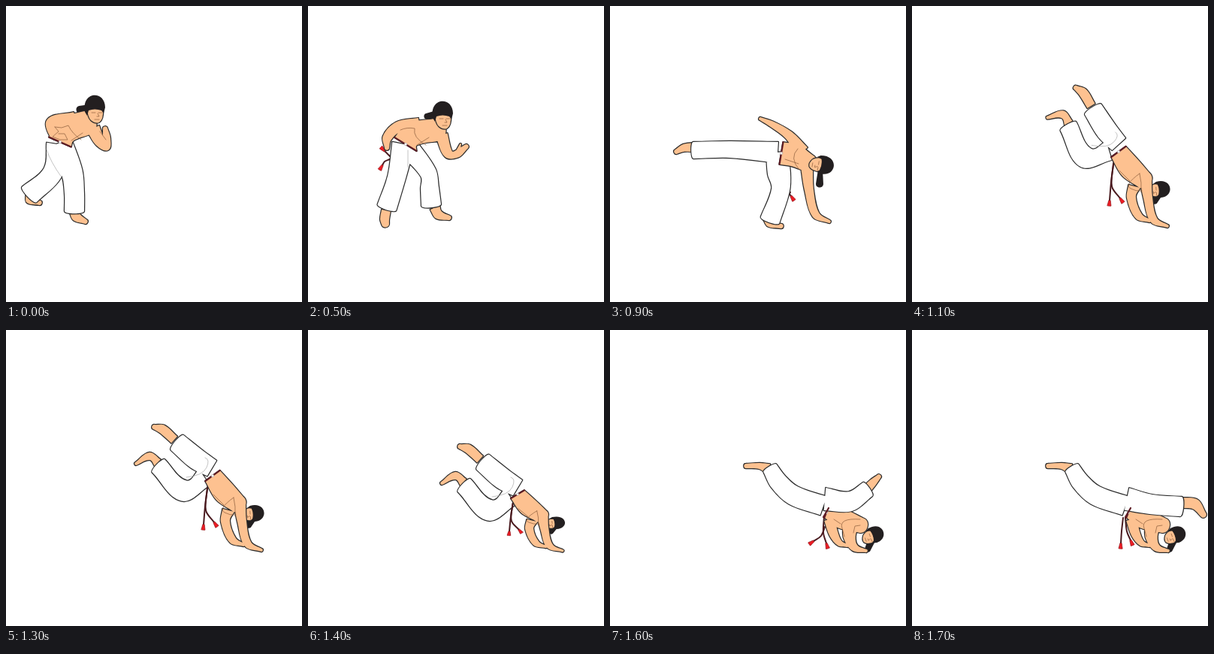
These frames come from a looping animation (394x394 px, 2.7 s). An HTML page:

```html
<!DOCTYPE html>
<html lang="en">
<head>
<meta charset="utf-8">
<title>Capoeira kick</title>
<style>
html, body { margin: 0; width: 100%; height: 100%; overflow: hidden; background: #fff; }
svg { display: block; width: 100%; height: 100%; }
path, circle { fill: none; stroke: #2b2b2b; stroke-linejoin: round; stroke-linecap: round; vector-effect: non-scaling-stroke; }
.skin, .cloth { stroke-width: 2.4; paint-order: stroke; }
.skin { fill: #fdc190; }
.cloth { fill: #fff; }
.hair { fill: #231f20; stroke: none; }
.shade { fill: #a9abae; stroke: none; }
.fold { stroke: #8a5c3c; stroke-width: .7; }
.crease { stroke: #aaa; stroke-width: .7; }
.belt { stroke: #5e1c24; stroke-width: 2.2; }
.cord { stroke: #4a1a1f; stroke-width: 2; }
.red { fill: #ed1c24; stroke: #8c1218; stroke-width: .7; }
.knot { fill: #fff; stroke: #aaa; stroke-width: .5; }
</style>
</head>
<body>
<svg id="stage" viewBox="0 0 394 394"></svg>
<script>
const parse = text => text.split(' ').map(s => s.split(',').map(Number));
const path = (kind, d) => `<path class="${kind}" d="${d}"/>`;
const group = (transform, art) => `<g transform="${transform}">${art}</g>`;

// Unit vector along a chain of points at index i.
function heading(pts, i) {
  const a = pts[Math.max(0, i - 1)], b = pts[Math.min(pts.length - 1, i + 1)];
  const len = Math.hypot(b[0] - a[0], b[1] - a[1]) || 1;
  return [(b[0] - a[0]) / len, (b[1] - a[1]) / len];
}
const shift = (p, v, k) => [p[0] + v[0] * k, p[1] + v[1] * k];

// Smooth open curve, without its starting point.
function smooth(pts) {
  return pts.slice(1).map((q, i) => {
    const p = pts[i], k = Math.hypot(q[0] - p[0], q[1] - p[1]) / 3;
    return `C${shift(p, heading(pts, i), k)} ${shift(q, heading(pts, i + 1), -k)} ${q}`;
  }).join('');
}

function sides(joints) {
  return [1, -1].map(s => joints.map((p, i) => {
    const [x, y] = heading(joints, i);
    return shift(p, [-y, x], s * p[2]);
  }));
}

// Limb outline around "x,y,radius" joints: flat at the start, capped at the end.
function tube(text, cap) {
  const joints = parse(text), end = joints.length - 1;
  const [left, right] = sides(joints);
  const dir = heading(joints, end), bulge = joints[end][2] * cap * 1.33;
  right.reverse();
  return `M${left[0]}${smooth(left)}C${shift(left[end], dir, bulge)} ${shift(right[0], dir, bulge)} ${right[0]}${smooth(right)}Z`;
}

// Tubes of one kind share a path, so only their common outline shows.
const limbs = (kind, cap) => (...list) => path(kind, list.map(s => tube(s, cap)).join(''));
const skin = limbs('skin', .9), legs = limbs('cloth', .25);
const pony = limbs('hair', .9), shade = limbs('shade', .9);
const folds = d => path('fold', d), crease = d => path('crease', d);

function body(torso, ...arms) {
  const [a, b] = sides(parse(torso)).map(side => side[0]);
  return skin(torso, ...arms) + path('belt', `M${a}L${b}`) +
    `<circle class="knot" cx="${(a[0] + b[0]) / 2}" cy="${(a[1] + b[1]) / 2}" r="1.8"/>`;
}

// Cord through the points, with a tassel hanging on in its last direction.
function cord(text) {
  const pts = parse(text), end = pts[pts.length - 1];
  const tip = shift(end, heading(pts, pts.length - 1), 7);
  return path('cord', `M${pts[0]}${smooth(pts)}`) + path('red', tube(`${end.join()},1.2 ${tip.join()},2.6`, .1));
}

const head = (x, y, turn = 0, size = 1) => group(`translate(${x} ${y}) rotate(${turn}) scale(${size})`,
  path('skin', 'M-10,0H11Q12,14 6,18Q1,20 -5,15Q-9,11 -10,0Z') +
  path('hair', 'M-13,4C-18,-24 14,-25 14,-2L12,6 9,2Q0,-1 -8,2L-10,9Z') +
  folds('M-4,5H1M5,5H10M0,14H6M4,6L6,10H3'));

const crouch =
  skin('33,252,7 31,258,5 45,262,3', '91,272,7 94,281,6 106,287,3') +
  pony('112,136,5 98,138,5') +
  legs('68,184,14 62,222,13 31,251,14', '72,182,16 88,222,14 91,250,13 91,273,13') +
  crease('M54,191Q59,207 74,228') +
  body('72,181,16 79,165,18 106,156,16', '92,149,8 60,157,8 64,171,6 74,177,4',
    '116,163,9 126,183,6 133,188,5 134,176,5 132,163,3') +
  folds('M65,161L74,162 83,159Q88,170 100,178M65,161L70,167 62,174 72,178H82L78,170H70M87,179L102,169M125,167L133,178') +
  head(118, 137);

const reach =
  skin('104,272,6 102,284,6 103,290,5', '169,268,7 174,278,6 188,282,3') +
  cord('109,200 106,197 102,193') + cord('109,204 102,207 99,212') +
  pony('172,144,5 158,147,4') +
  legs('127,184,15 118,228,12 105,268,13', '133,188,14 160,222,11 162,242,12 164,265,13') +
  crease('M133,192V215') +
  body('130,184,17 138,171,16 170,165,15', '148,157,8 120,161,7 105,176,6 105,189,3',
    '178,172,8 187,197,6 198,197,5 211,187,3', '199,195,3 203,184,1') +
  folds('M123,165Q132,161 142,163Q139,175 157,185M145,185L161,175') +
  head(179, 145);

const lunge =
  skin('110,277,5 105,286,4 95,288,2', '211,277,5 210,286,4 235,288,2') +
  cord('199,241 197,253 188,256') +
  legs('192,212,14 152,245,14 117,278,14', '196,216,13 209,235,13 211,278,14') +
  head(242, 172, -5, .85) +
  body('190,211,15 206,194,16 226,182,11', '226,181,9 249,191,5 264,193,4 278,194,2',
    '232,192,9 242,214,6 258,236,5 268,253,3') +
  folds('M242,194Q222,192 209,182Q202,198 216,206M200,208L220,196');

const kick =
  skin('112,188,6 98,189,5 88,194,3', '212,284,8 212,290,4 228,293,3') +
  cord('240,248 239,250 241,253') +
  legs('223,195,14 160,191,11 111,192,11', '222,195,14 225,223,15 227,245,12 213,285,13') +
  body('228,196,15 246,199,15 264,209,12', '256,194,9 238,172,6 215,157,4 200,150,2',
    '262,214,8 265,245,6 274,278,5 292,287,2') +
  folds('M250,190Q238,202 252,218M233,204L251,210') +
  pony('280,218,3 279,237,5') + head(282, 211, 100, .88);

const tuckedLegs =
  skin('224,146,6 208,132,6 197,129,3', '202,177,6 191,168,5 173,178,2') +
  legs('274,184,12 254,172,14 228,150,13', '264,196,13 237,214,14 203,181,12') +
  crease('M240,196Q262,194 267,183T265,170');

const highBody =
  cord('269,204 265,235 263,259') + cord('268,210 266,240 277,256') +
  pony('330,246,6 323,260,4') + head(329, 244, 85, .8) +
  body('275,194,12 291,216,15 308,231,12', '296,240,8 292,255,6 302,280,5 316,286,2',
    '311,229,8 314,255,6 322,285,5 340,293,2') +
  folds('M303,223Q282,238 291,243Q298,247 306,246M303,223Q306,235 305,248M276,219L290,233');

const lowBody =
  pony('348,280,5 343,292,4') +
  body('288,243,7 308,251,13 334,260,10', '292,252,7 298,272,6 306,284,4 316,287,2',
    '320,262,10 319,276,8 326,290,5 341,294,2') +
  head(350, 273, 70, .8) +
  folds('M333,252Q304,250 309,264L312,275M298,252L307,258M324,270L326,261 333,260');

const foldedLegs =
  cord('285,248 284,270 288,284') + cord('286,262 281,274 271,281') + lowBody +
  skin('230,208,7 216,196,6 210,190,4') +
  legs('286,239,9 258,225,14 236,211,11', '302,228,11 293,218,16 281,212,11') +
  shade('273,212,4 285,217,7 294,223,3') +
  skin('272,207,4 289,208,6 303,216,4') +
  crease('M276,226Q281,235 277,244');

const spread = (knee, cuff, ...foot) =>
  lowBody +
  skin('211,185,7 199,181,4 181,181,3', foot.join(' ')) +
  legs('284,234,13 244,220,13 224,202,12 213,184,10', `286,225,15 ${knee} ${cuff}`) +
  path('belt', 'M284,249L291,237');

const openLegs =
  cord('285,248 284,270 288,284') + cord('286,262 281,274 271,281') +
  spread('320,228,13', '343,212,11', '340,214,6', '350,203,5', '358,195,3');

const splitLegs =
  cord('281,250 279,268 278,284') + cord('284,250 286,268 291,280') +
  spread('318,232,13', '358,235,13', '358,230,7', '377,232,7', '388,246,4');

const poses = [
  [0, crouch],
  [500, reach],
  [700, lunge],
  [900, kick],
  [1100, group('rotate(17 275 188)', tuckedLegs) + highBody],
  [1300, tuckedLegs + highBody],
  [1400, group('translate(5 26)', tuckedLegs) +
    group('translate(325 297) scale(.92 .76) translate(-325 -297)', highBody)],
  [1500, foldedLegs],
  [1600, openLegs],
  [1700, splitLegs]
];

const stage = document.getElementById('stage');
stage.innerHTML = poses.map(([, art]) => `<g visibility="hidden">${art}</g>`).join('');
const layers = [...stage.children];

function tick() {
  const t = performance.now() % 2700;
  const now = poses.filter(([start]) => start <= t).length - 1;
  layers.forEach((g, i) => g.setAttribute('visibility', i === now ? 'visible' : 'hidden'));
  requestAnimationFrame(tick);
}
tick();
</script>
</body>
</html>
```
